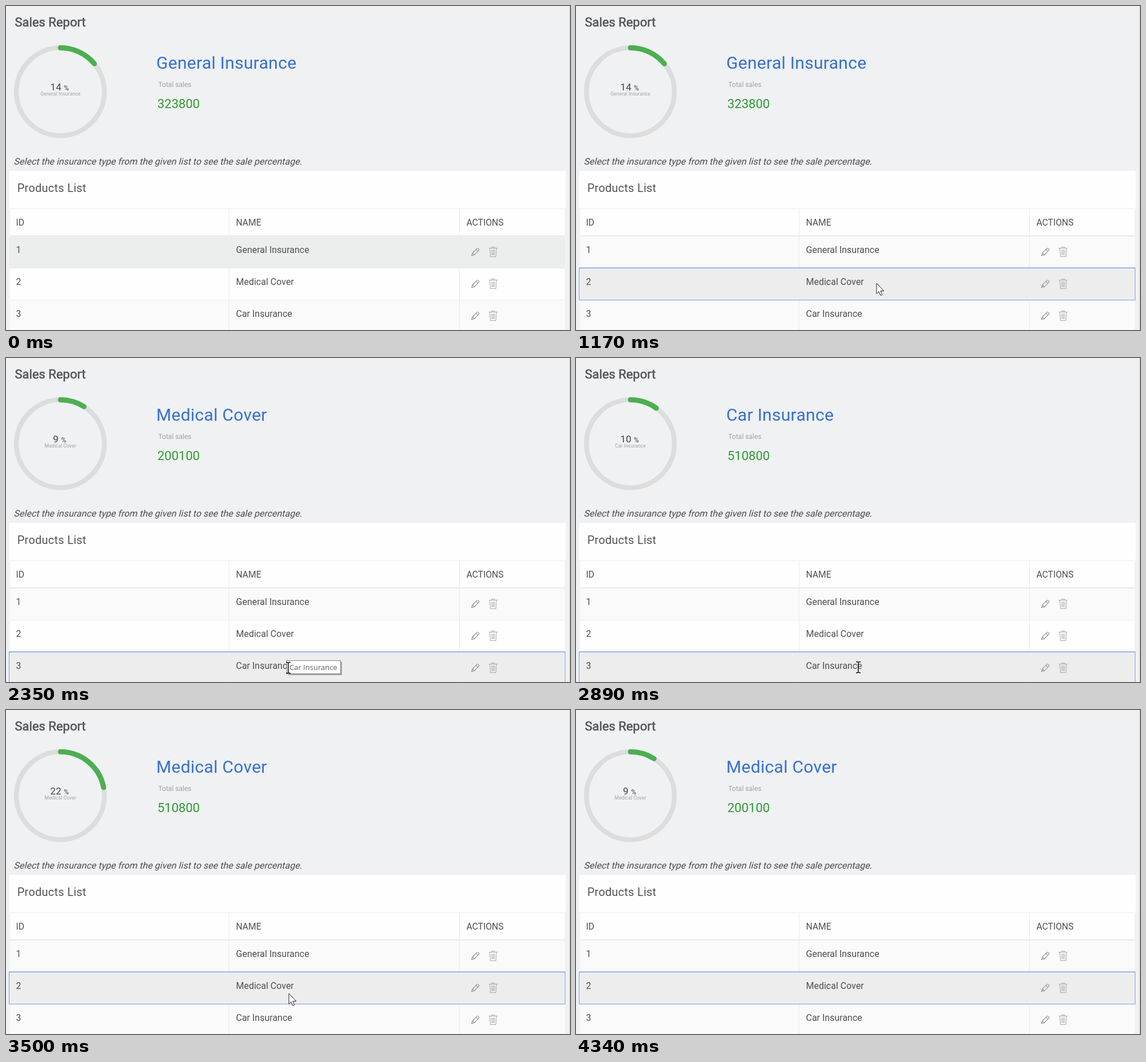
These frames come from a looping animation (987 px wide and 568 px high, 4.43 s). An HTML page:

```html
<!DOCTYPE html>
<html lang="en">
<head>
<meta charset="utf-8">
<title>Sales Report</title>
<style>
html, body { margin: 0; width: 100%; height: 100%; overflow: hidden; background: #f0f1f3; }
svg { display: block; width: 987px; height: 568px; font-family: Roboto, sans-serif; }
text { white-space: pre; }
</style>
</head>
<body>
<svg id="stage" viewBox="0 0 987 568" xmlns="http://www.w3.org/2000/svg">
  <defs>
    <g id="icons" fill="none">
      <path d="M814.8 437.8l1.2-4.8 8.2-8.1q.9-.8 1.8 0l1.6 1.6q.9.9 0 1.8l-8.2 8.1zM816 433l3.4 3.4M822.4 426.7l3.4 3.4" stroke="#959691" stroke-width="1.1"/>
      <path d="M845 424.5h15M850 424.5v-2h5v2M846.7 424.5l1 15h9.6l1-15M850 427l.4 10M852.5 427v10M855 427l-.4 10" stroke="#a6aaa0"/>
    </g>
  </defs>
  <rect width="987" height="568" fill="#f0f1f3"/>
  <rect x="986" width="1" height="568" fill="#cfd0d2"/>

  <text x="15.5" y="36" font-size="22" fill="#555" stroke="#555" stroke-width=".6">Sales Report</text>

  <g fill="none">
    <circle cx="95.2" cy="150.3" r="77" stroke="#ddd" stroke-width="8.6"/>
    <path id="arc" stroke="#4caf50" stroke-width="9" stroke-linecap="round"/>
  </g>
  <text x="93.8" y="147.5" font-size="17" fill="#444" text-anchor="middle"><tspan id="percent"></tspan><tspan dx="4.5" font-size="12">%</tspan></text>
  <text id="label" x="95.2" y="157" font-size="8.75" fill="#a6a6a6" text-anchor="middle"></text>

  <text id="title" x="263" y="110" font-size="30" letter-spacing=".3" fill="#3470d3"></text>
  <text x="266.5" y="142" font-size="12" fill="#a3a3a3">Total sales</text>
  <text id="sales" x="265" y="179" font-size="22" fill="#2f9a33"></text>
  <text transform="translate(13.6 278) skewX(-14)" font-size="16" fill="#4c4c4c">Select the insurance type from the given list to see the sale percentage.</text>

  <rect x="5.5" y="289" width="974" height="279" fill="#fefefe"/>
  <text x="19.7" y="325.5" font-size="20" letter-spacing=".25" fill="#555">Products List</text>
  <g id="rows"></g>
  <path d="M5.5 355.5H979M6.5 355V568M390.5 355V568M793.5 355V568M978.5 355V568M6 459.5H979M6 515.5H979" stroke="#ebebeb" fill="none"/>
  <path d="M6 403H979" stroke="#ebebeb" stroke-width="2"/>
  <path id="dashes" d="M6 460.5H979M6 515.5H979" stroke="#d9d9d9" stroke-dasharray="1 1"/>
  <g id="focus">
    <rect x="5.5" y="403.5" width="973" height="56" fill="none" stroke="#75a3ea"/>
    <rect id="focusTop" x="5" y="402.5" width="974" height="1.5" fill="#75a3ea"/>
  </g>
  <g id="cells" font-size="16" fill="#505050"></g>

  <g id="tip">
    <rect x="494" y="533" width="94" height="23" fill="#000" opacity=".3"/>
    <rect x="491.5" y="530.5" width="94" height="23" fill="#fff" stroke="#868686"/>
    <text x="496" y="547" font-size="13" fill="#606060" style="font-family:'Open Sans',sans-serif">Car Insurance</text>
  </g>
  <path id="arrow" d="M0 0V18.3L4 14.6 7 21.3 9.8 20.1 7 13.5H12.8Z" fill="#fff" stroke="#222" stroke-width="1"/>
  <path id="beam" d="M-4 -9.5H-1.5L0 -8.5 1.5 -9.5H4M0 -8.5V8.5M-4 9.5H-1.5L0 8.5 1.5 9.5H4" fill="none" stroke="#111" stroke-width="1.5"/>
</svg>
<script>
const LOOP = 4430, ROW_TOP = 403, ROW_H = 56, TICK = 38;
const $ = id => document.getElementById(id);
const NS = 'http://www.w3.org/2000/svg';

const products = [
  { name: 'General Insurance', sales: 323800, share: 14 },
  { name: 'Medical Cover', sales: 200100, share: 9 },
  { name: 'Car Insurance', sales: 510800, share: 22 }
];
// Each click: row focus, then labels, then sales and the gauge count
const clicks = [
  { row: 0, focus: 0, label: 0, data: 0 },
  { row: 1, focus: 1170, label: 1245, data: 1740 },
  { row: 2, focus: 2300, label: 2450, data: 2852 },
  { row: 1, focus: 3420, label: 3490, data: 3830 }
];
// Pointer path: time, x, y
const path = [
  [310, 545, 562], [460, 538, 520], [600, 528, 477], [730, 526, 486],
  [1650, 526, 486], [1720, 524, 486], [1930, 508, 510], [2150, 494, 543],
  [2885, 494, 543], [3120, 495.5, 511.5], [3330, 495, 497], [3670, 495, 497]
];

function add(parent, tag, attrs, text) {
  const el = document.createElementNS(NS, tag);
  for (const k in attrs) el.setAttribute(k, attrs[k]);
  if (text !== undefined) el.textContent = text;
  return parent.appendChild(el);
}
const show = (id, on) => $(id).setAttribute('visibility', on ? 'visible' : 'hidden');
const move = (id, x, y) => $(id).setAttribute('transform', `translate(${x} ${y})`);

[['ID', 17.5], ['NAME', 402.5], ['ACTIONS', 805.7]].forEach(([text, x]) =>
  add($('cells'), 'text', { x, y: 384.5, 'font-size': 15.7 }, text));
const rows = products.map((p, i) => {
  const dy = i * ROW_H;
  add($('cells'), 'text', { x: 17.5, y: 433 + dy }, i + 1);
  add($('cells'), 'text', { x: 402.5, y: 433 + dy }, p.name);
  add($('cells'), 'use', { href: '#icons', y: dy });
  return add($('rows'), 'rect', { x: 5.5, y: ROW_TOP + dy, width: 973.5, height: ROW_H });
});

function pointer(t) {
  const i = path.findIndex(p => p[0] > t);
  if (i < 1) return null;
  const [t0, x0, y0] = path[i - 1], [t1, x1, y1] = path[i];
  const k = (t - t0) / (t1 - t0);
  return { x: x0 + (x1 - x0) * k, y: y0 + (y1 - y0) * k };
}

const lastClick = (t, key) => clicks.filter(c => c[key] <= t).length - 1;

function shareAt(t, n) {
  const to = products[clicks[n].row].share;
  if (!n) return to;
  const from = products[clicks[n - 1].row].share;
  const steps = Math.min(Math.floor((t - clicks[n].data) / TICK), Math.abs(to - from));
  return from + Math.sign(to - from) * steps;
}

function drawGauge(share) {
  const a = share / 100 * 2 * Math.PI, r = 77, cx = 95.2, cy = 150.3;
  $('arc').setAttribute('d',
    `M${cx} ${cy - r}A${r} ${r} 0 0 1 ${cx + r * Math.sin(a)} ${cy - r * Math.cos(a)}`);
  $('percent').textContent = share;
}

function drawRows(hover, selected, focused) {
  rows.forEach((el, i) => {
    const lit = i === hover || i === selected;
    const fill = lit ? (focused || i ? '#ededed' : '#eceeed') : i % 2 ? '#fefefe' : '#fafafa';
    el.setAttribute('fill', fill);
  });
  show('dashes', hover === 1 && selected !== 1);
  show('focus', focused);
  move('focus', 0, selected * ROW_H);
  show('focusTop', focused && hover !== selected - 1);
}

function draw(t) {
  const name = products[clicks[lastClick(t, 'label')].row].name;
  $('title').textContent = $('label').textContent = name;

  const data = lastClick(t, 'data');
  $('sales').textContent = products[clicks[data].row].sales;
  drawGauge(shareAt(t, data));

  const p = pointer(t), focus = lastClick(t, 'focus');
  const hover = p ? Math.floor((p.y - ROW_TOP) / ROW_H) : -1;
  drawRows(hover, clicks[focus].row, focus > 0);

  const overText = p && p.x < 501 && p.y > 530;
  show('arrow', p && !overText);
  show('beam', overText);
  show('tip', t >= 2200 && t < 2490);
  if (p) {
    move('arrow', p.x, p.y);
    move('beam', p.x, p.y);
  }
}

const start = performance.now();
function frame() {
  draw((performance.now() - start) % LOOP);
  requestAnimationFrame(frame);
}
frame();
</script>
</body>
</html>
```
